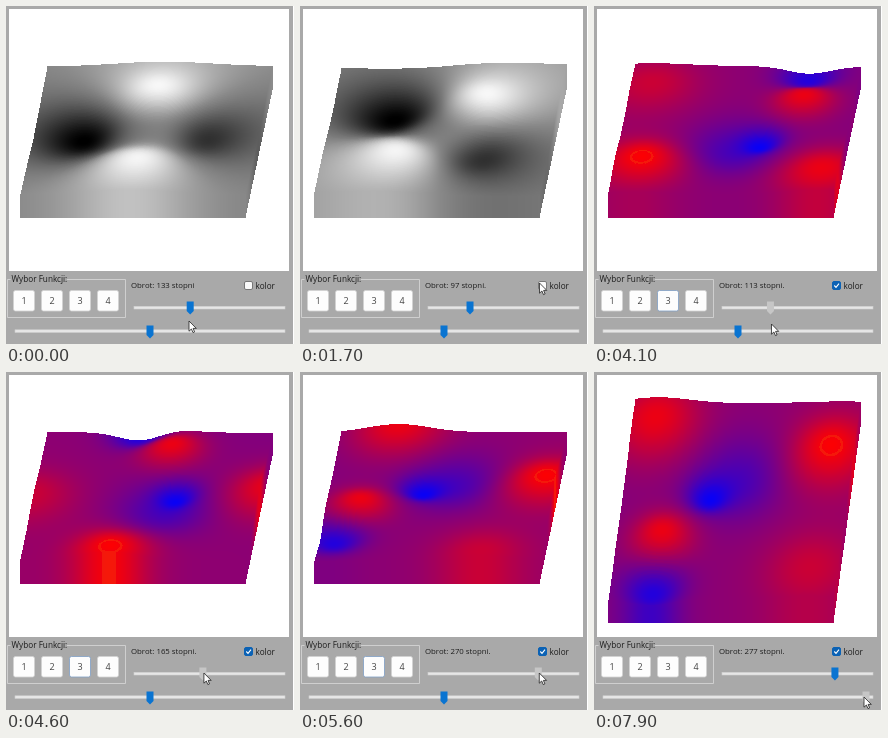
These frames come from a looping animation (288 by 338 pixels, 8000 ms). An HTML page with a canvas:

```html
<!DOCTYPE html>
<html lang="pl">
<head>
<meta charset="utf-8">
<title>Wykres funkcji</title>
<style>
html, body { margin: 0; width: 100%; height: 100%; overflow: hidden; background: #a9a9a9; }
#stage { position: relative; width: 288px; height: 338px; overflow: hidden; }
canvas, svg { position: absolute; left: 0; top: 0; display: block; }
canvas { left: 3px; top: 3px; background: #fff; }
text { font-family: "Open Sans", "Noto Sans", sans-serif; font-size: 8.2px; fill: #1c1c1c; }
#label { font-size: 7.8px; }
.btn rect { fill: #fdfdfd; stroke: #d2d2d2; stroke-width: .8; }
.btn text { font-size: 9px; text-anchor: middle; fill: #444; }
.btn.focus rect { stroke: #7f9fc6; }
.btn.hover rect { fill: #dbe8f4; }
.track { fill: #e6e6e6; stroke: #cfcfcf; stroke-width: .6; }
.thumb { fill: #0a74d1; }
.thumb.drag { fill: #c6c6c6; }
</style>
</head>
<body>
<div id="stage">
<canvas id="plot" width="280" height="262"></canvas>
<svg id="ui" width="288" height="338" viewBox="0 0 288 338">
  <rect x="287" width="1" height="338" fill="#fff"/>
  <path d="M4.500 273.500H1.500V311.500H119.500V273.500H61" fill="none" stroke="#d4d4d4" stroke-width=".9"/>
  <text x="5.500" y="276">Wybor Funkcji:</text>
  <g id="buttons"></g>
  <text id="label" x="125" y="282"></text>
  <rect id="box" x="238.500" y="275.500" width="8" height="8" rx="1.500"/>
  <path id="tick" d="M240.300 279.500l1.700 1.800 3-3.600" fill="none" stroke="#fff" stroke-width="1.100"/>
  <text x="249.500" y="282.500">kolor</text>
  <rect class="track" x="128" y="300.300" width="151" height="2.700"/>
  <rect class="track" x="9" y="323.800" width="270" height="2.700"/>
  <path id="turn" class="thumb" d="M-3.500 -6.500h7v9.500l-3.500 3.500l-3.500 -3.500z"/>
  <path id="tilt" class="thumb" d="M-3.500 -6.500h7v9.500l-3.500 3.500l-3.500 -3.500z"/>
  <path id="cursor" d="M0 0V10.200L2.400 8L4 11.600L5.600 10.900L4.100 7.400H7.300Z" fill="#fff" stroke="#222" stroke-width=".8"/>
</svg>
</div>
<script>
const LOOP = 8000, STEP = 100, LAG = 190;
const W = 280, H = 262, OX = 3, OY = 3;
const $ = id => document.getElementById(id);
const rad = a => a * Math.PI / 180;
const mix = (a, b, p) => a + (b - a) * p;
const ramp = (t, a, b) => Math.min(1, Math.max(0, (t - a) / (b - a)));
const smooth = (t, a, b) => { const p = ramp(t, a, b); return p * p * (3 - 2 * p); };
const between = (t, a, b) => t >= a && t < b;

const angleAt = t => 133 - 36 * smooth(t, 300, 1150) + 180 * smooth(t, 3700, 5850);
const tiltAt = t => mix(144, 272, ramp(t, 6370, 7900));
const turnX = t => 131.8 + 0.394 * angleAt(t);

// the pointer glides from spot to spot, and a spot on a thumb moves with it
const onTurn = t => [turnX(t) + 1, 301 + 17 * Math.sin(Math.PI * ramp(t, 3700, 4500))];
const onBox = () => [239.5, 277];
const onButton = () => [76, 300];
const onTilt = t => [tiltAt(t) - 2, 322 + 3 * ramp(t, 6900, 7900)];
const MOVES = [[0, 300, onTurn], [1300, 1700, onBox], [2200, 2700, onButton], [2750, 3480, onTurn], [5900, 6350, onTilt]];

function pointerAt(t) {
  return MOVES.reduce(([x, y], [leave, arrive, spot]) => {
    const p = smooth(t, leave, arrive), [sx, sy] = spot(t);
    return [mix(x, sx, p), mix(y, sy, p)];
  }, [183, 315]);
}

function bump(x, y, cx, cy, s) {
  const dx = x - cx, dy = y - cy;
  return Math.exp(-(dx * dx + dy * dy) / (2 * s * s));
}

// two hills and two hollows around a saddle
function saddle(x, y) {
  const q = (x * x + y * y) / 0.3136;
  const c = Math.cos(2 * (Math.atan2(y, x) - rad(51)));
  const wave = c * Math.pow(2 * q / (1 + q * q), 1.25);
  return 0.54 + wave * (c > 0 ? 0.44 : 0.35) - 0.2 * bump(x, y, -0.48, 0.29, 0.35);
}

// x, y, width, height
const HILLS = [
  [-0.8, 0.78, 0.28, 0.4], [0.79, 0.48, 0.25, 0.42], [-0.6, -0.4, 0.19, 0.42], [0.75, -0.73, 0.28, 0.22],
  [-0.25, 0.11, 0.13, -0.33], [0, 0.25, 0.3, -0.27], [-0.62, -0.84, 0.19, -0.42]
];
const hilly = (x, y) => HILLS.reduce((z, [cx, cy, s, a]) => z + a * bump(x, y, cx, cy, s), 0.55 + 0.03 * x);

const ctx = $("plot").getContext("2d");
const img = ctx.createImageData(W, H);
const px = new Uint32Array(img.data.buffer);

function shade(z, color) {
  const k = Math.round(255 * Math.min(1, Math.max(0, z)));
  if (!color) return (0xff000000 | k << 16 | k << 8 | k) >>> 0;
  const ring = between(z, 0.95, 0.965) ? 24 : 0;
  return (0xff000000 | (255 - k) << 16 | ring << 8 | k) >>> 0;
}

// each column is filled from the front edge backwards, above what is already drawn
function drawSurface(fn, turn, tilt, color) {
  px.fill(0xffffffff);
  const d = tilt - 144, depth = 128 + 0.53 * d;
  const front = 212 + 0.22 * d + 0.00065 * d * d;
  const c = Math.cos(turn), s = Math.sin(turn), rows = 220;
  for (let sx = 14; sx < 267; sx++) {
    let top = 0, begun = false;
    for (let i = 0; i <= rows; i++) {
      const v = i / rows, u = (sx - 14 - 27 * v) / 225;
      if (u < 0) break;
      if (u > 1) continue;
      const x = 2 * u - 1, y = 2 * v - 1;
      const z = fn(x * c + y * s, y * c - x * s);
      const ground = front - depth * v;
      if (!begun) { top = Math.round(ground); begun = true; }
      const head = Math.round(ground - 12.5 - 21 * z);
      if (head >= top) continue;
      const rgb = shade(z, color);
      while (top > head) {
        top--;
        const row = top - OY;
        if (row >= 0 && row < H) px[row * W + sx - OX] = rgb;
      }
    }
  }
  ctx.putImageData(img, 0, 0);
}

$("buttons").innerHTML = [1, 2, 3, 4].map(n => {
  const x = 28 * n - 10;
  return `<g class="btn" id="b${n}"><rect x="${x - 10.5}" y="284.500" width="21" height="20.500" rx="2"/>` +
    `<text x="${x}" y="298">${n}</text></g>`;
}).join("");

const place = (id, x, y) => $(id).setAttribute("transform", `translate(${x.toFixed(2)} ${y.toFixed(2)})`);

let lastKey = "";

function render(t) {
  const tilt = tiltAt(t), seen = angleAt(t - LAG);
  const color = t >= 2100, second = t >= 3600;

  const key = [seen, tilt, color, second].join();
  if (key !== lastKey) {
    lastKey = key;
    drawSurface(second ? hilly : saddle, rad(seen - (second ? 277 : 97)), tilt, color);
  }

  $("label").textContent = `Obrot: ${Math.round(angleAt(t))} stopni${t > 300 ? "." : ""}`;
  place("turn", turnX(t), 302);
  place("tilt", tilt, 326);
  $("turn").classList.toggle("drag", between(t, 300, 1300) || between(t, 3500, 5900));
  $("tilt").classList.toggle("drag", t >= 6350);

  $("b3").classList.toggle("focus", between(t, 2700, 6350));
  $("b3").classList.toggle("hover", between(t, 2700, 3400));
  $("box").setAttribute("fill", color ? "#0b62b5" : "#fafafa");
  $("box").setAttribute("stroke", color ? "#0b62b5" : "#777");
  $("tick").setAttribute("visibility", color ? "visible" : "hidden");
  place("cursor", ...pointerAt(t));
}

const start = performance.now();
let shown = -1;
function tick() {
  const t = Math.floor((performance.now() - start) % LOOP / STEP) * STEP;
  if (t !== shown) render(shown = t);
  requestAnimationFrame(tick);
}
tick();
</script>
</body>
</html>
```
